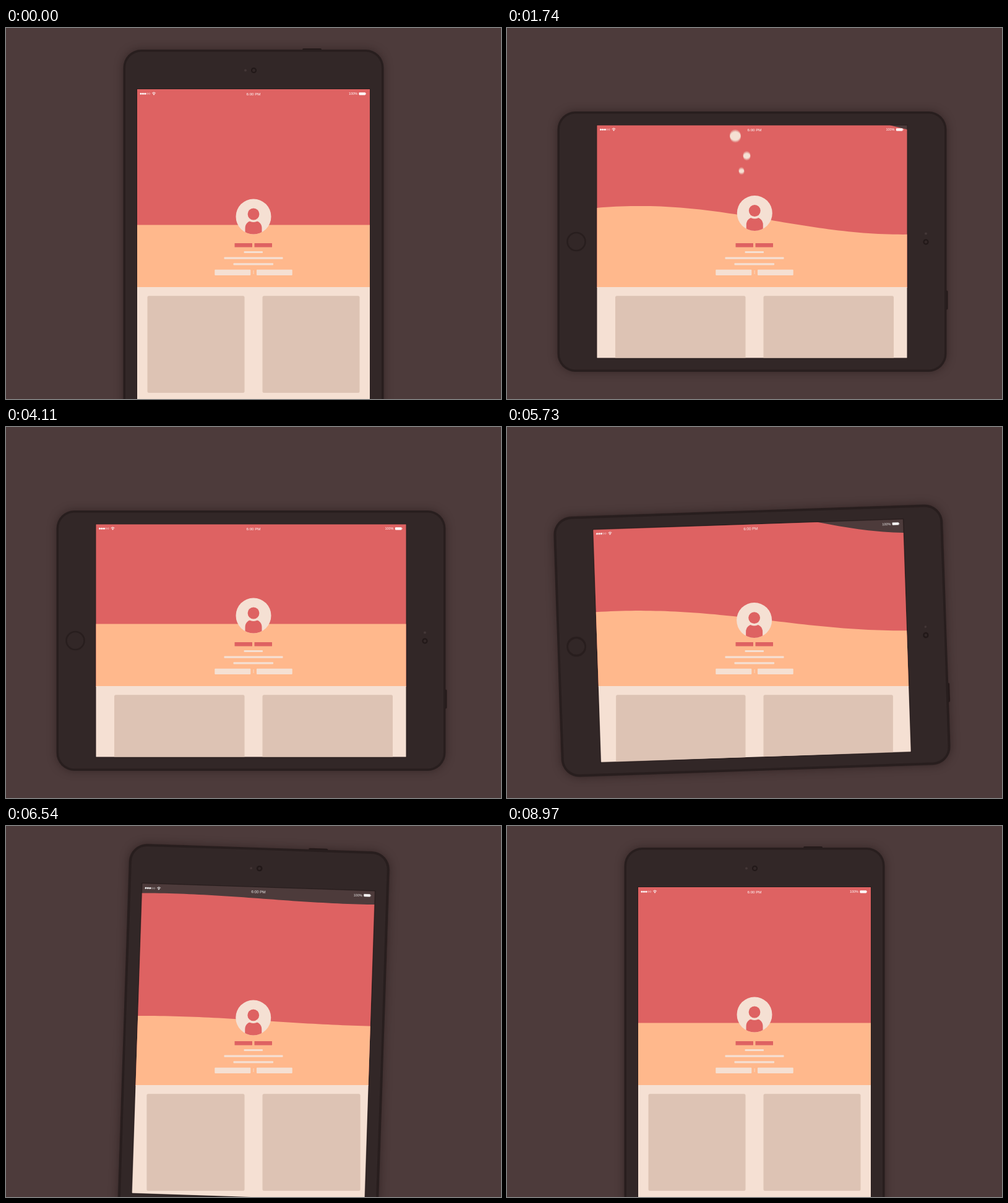
These frames come from a looping animation (800x600 px, 9000 ms). An HTML page with a canvas:

```html
<!DOCTYPE html>
<html lang="en">
<head>
<meta charset="utf-8">
<title>Tablet rotation</title>
<style>
  html, body { margin: 0; width: 100%; height: 100%; overflow: hidden; background: #4d3b3b; }
  canvas { display: block; }
</style>
</head>
<body>
<canvas id="stage" width="800" height="600"></canvas>
<script>
const W = 800, H = 600, LOOP = 9000;
const view = document.getElementById('stage').getContext('2d');
const buffer = document.createElement('canvas');
buffer.width = W;
buffer.height = H;
const g = buffer.getContext('2d');

const C = {
  bg: '#4d3b3b', body: '#322727', edge: '#281e1e', red: '#de6262',
  orange: '#ffb88c', cream: '#f5e0d3', card: '#ddc3b4'
};

// Rotation timing; the return trip replays the same slosh, mirrored.
const START = 366, TURN = 1260, BACK = 5139, SHUTTER = 16;
const PIVOT = [400, 345.5];

// [time, value] keys of the liquid after a turn
const slosh = {
  low: [[366, 0], [591, 16], [1080, 62.5], [1401, 8.8], [1740, -23], [2350, 11], [2900, -5], [3400, 2], [3860, 0]],
  top: [[366, 0], [591, 27.8], [1080, 61], [1401, 9.6], [1740, -46], [2350, 12], [2900, -5], [3400, 2], [3860, 0]],
  lift: [[366, 0], [591, 11.8], [1080, 25], [1401, -18.5], [1740, -28], [2350, 5], [2900, -2], [3860, 0]],
  shift: [[366, 250], [591, 250], [1080, 185], [1401, 215], [1740, 330], [2350, 215], [3860, 215]],
  bob: [[366, 0], [591, 7.5], [1080, 18.5], [1401, 5], [1740, -5.5], [2220, 5.5], [2700, -3], [3150, 1.5], [3550, -0.6], [3860, 0]]
};

// start time, start point, point at 1740 ms, radius
const bubbles = [
  [1000, 388, 307, 369, 175, 9],
  [1150, 396, 310, 387.5, 207, 6],
  [1300, 392, 305, 379, 231.5, 4.5]
];

// Smooth curve through the keys, flat at both ends
function curve(keys, t) {
  const last = keys.length - 1;
  if (t <= keys[0][0]) return keys[0][1];
  if (t >= keys[last][0]) return keys[last][1];
  let i = 0;
  while (t > keys[i + 1][0]) i++;
  const slope = k => k < 1 || k >= last ? 0
    : (keys[k + 1][1] - keys[k - 1][1]) / (keys[k + 1][0] - keys[k - 1][0]);
  const [a, va] = keys[i], [b, vb] = keys[i + 1];
  const d = b - a, u = (t - a) / d, v = 1 - u;
  return va * v * v * (1 + 2 * u) + vb * u * u * (3 - 2 * u)
    + d * u * v * (slope(i) * v - slope(i + 1) * u);
}

// cubic-bezier(.8, 0, .2, 1)
function ease(x) {
  if (x <= 0) return 0;
  if (x >= 1) return 1;
  let lo = 0, hi = 1, u = 0.5;
  for (let i = 0; i < 24; i++) {
    u = (lo + hi) / 2;
    const bx = 2.4 * u * (1 - u) ** 2 + 0.6 * u * u * (1 - u) + u ** 3;
    if (bx < x) lo = u; else hi = u;
  }
  return u * u * (3 - 2 * u);
}

const turned = t => ease((t - START) / TURN) - ease((t - BACK - START) / TURN);

function rect(x, y, w, h, color, r = 0) {
  g.fillStyle = color;
  g.beginPath();
  g.roundRect(x, y, w, h, r);
  g.fill();
}

function disc(x, y, r, color) {
  g.fillStyle = color;
  g.beginPath();
  g.arc(x, y, r, 0, 7);
  g.fill();
}

function ring(x, y, r, width, color) {
  g.strokeStyle = color;
  g.lineWidth = width;
  g.beginPath();
  g.arc(x, y, r, 0, 7);
  g.stroke();
}

function enterDevice(p) {
  g.translate(...PIVOT);
  g.rotate(p * Math.PI / 2);
  g.translate(0, 4);
}

function drawBody() {
  rect(79, -316.5, 31, 6, C.edge, 2);
  g.save();
  g.shadowColor = 'rgba(30,18,18,.5)';
  g.shadowBlur = 14;
  rect(-210.5, -314.5, 421, 629, C.edge, 29);
  g.restore();
  rect(-207, -311, 414, 622, C.body, 25.5);
  ring(0.5, -281, 3.5, 2, '#211818');
  disc(-13, -281, 2, '#443737');
  ring(0, 284, 14.5, 2.6, C.edge);
  rect(-189, -251.5, 378, 503, C.edge);
}

// Fills from the wave y = mid + amp * cos down to a flat bottom.
function wave(mid, amp, x0, half, bottom, color) {
  g.fillStyle = color;
  g.beginPath();
  g.moveTo(0, bottom);
  for (let x = 0; x <= W; x += 8) g.lineTo(x, mid + amp * Math.cos(Math.PI * (x - x0) / half));
  g.lineTo(W, bottom);
  g.fill();
}

function drawAvatar(bob) {
  g.save();
  g.translate(400 - bob * 0.05, 305 + bob);
  disc(0, 0, 28.5, C.cream);
  g.beginPath();
  g.arc(0, 0, 28.5, 0, 7);
  g.clip();
  rect(-13.5, 6.5, 27, 32, C.red, 12);
  disc(0, -4, 13, C.cream);
  disc(0, -4, 9.4, C.red);
  g.restore();
}

function drawBubbles(t) {
  for (const [t0, x0, y0, x1, y1, r] of bubbles) {
    const u = (t - t0) / (1740 - t0);
    if (u < 0) continue;
    const y = y0 + (y1 - y0) * u ** 1.6;
    if (y > 140) disc(x0 + (x1 - x0) * u, y, r, C.cream);
  }
}

function drawPage(t, now, p) {
  const back = t > 5200, s = back ? t - BACK : t, dir = back ? -1 : 1;
  const low = dir * curve(slosh.low, s);
  const top = 98 + 58.5 * p + dir * curve(slosh.lift, s);
  wave(top, dir * curve(slosh.top, s), curve(slosh.shift, s), 405, 420, C.red);
  wave(318.5 + 0.33 * low, low, 215, 425, 420, C.orange);
  rect(0, 419, W, 181, C.cream);

  const wide = 157 + 53.5 * p;
  rect(385.5 - wide, 433.3, wide, 156.7, C.card, 2.5);
  rect(414.5, 433.3, wide, 156.7, C.card, 2.5);

  drawBubbles(now);
  drawAvatar(curve(slosh.bob, s));

  rect(369.5, 348, 28.5, 6.5, C.red, 0.5);
  rect(401.5, 348, 28.5, 6.5, C.red, 0.5);
  rect(384.5, 361, 30.5, 3, C.cream, 1);
  rect(352.5, 370.5, 95, 3.2, C.cream, 1);
  rect(367.5, 380.2, 64.5, 3.3, C.cream, 1);
  rect(337.3, 390.8, 58, 9.2, C.cream, 1);
  rect(405, 390.8, 57.7, 9.2, C.cream, 1);
  rect(399.6, 392, 0.8, 6, C.cream);
}

// x runs from the left to the right edge of the screen, y is the bar's middle.
function drawStatus(left, right, mid, y) {
  for (let i = 0; i < 5; i++) {
    const x = left + 6 + i * 3.4;
    if (i < 3) disc(x, y, 1.5, '#fff');
    else ring(x, y, 1.2, 0.4, '#fff');
  }
  const wx = left + 27;
  g.strokeStyle = '#fff';
  g.lineWidth = 0.9;
  for (const r of [2.3, 4]) {
    g.beginPath();
    g.arc(wx, y + 2, r, -Math.PI * 0.76, -Math.PI * 0.24);
    g.stroke();
  }
  disc(wx, y + 1.4, 0.9, '#fff');

  g.fillStyle = '#fff';
  g.textBaseline = 'alphabetic';
  g.textAlign = 'center';
  g.font = '6.2px "Liberation Sans", Arial, sans-serif';
  g.fillText('6:00 PM', mid, y + 2.3);
  g.textAlign = 'right';
  g.font = '5.5px "Liberation Sans", Arial, sans-serif';
  g.fillText('100%', right - 20, y + 2.2);
  rect(right - 17.6, y - 2, 10.6, 4.2, '#fff', 0.8);
  rect(right - 6.7, y - 0.8, 0.8, 1.8, '#fff', 0.4);
}

// t drives the page, now is the moment within the open shutter.
function drawScene(t, now) {
  const p = turned(now);
  g.fillStyle = C.bg;
  g.fillRect(0, 0, W, H);

  g.save();
  enterDevice(p);
  drawBody();
  g.restore();

  g.save();
  g.save();
  enterDevice(p);
  g.beginPath();
  g.rect(-188, -250.5, 376, 501);
  g.restore();
  g.clip();
  g.fillStyle = C.bg;
  g.fillRect(0, 0, W, H);
  drawPage(t, now, turned(t));
  g.restore();

  g.save();
  enterDevice(p);
  if (p < 0.5) {
    drawStatus(-188, 188, 0, -243.3);
  } else {
    g.rotate(-Math.PI / 2);
    drawStatus(-250.5, 250.5, 4, -181.3);
  }
  g.restore();
}

function render(t) {
  const rising = t > 1000 && t < 2300;
  const turning = Math.abs(turned(t + 8) - turned(t - 8)) > 0.002;
  const n = rising || turning ? 10 : 1;
  for (let i = 0; i < n; i++) {
    drawScene(t, t + ((i + 0.5) / n - 0.5) * SHUTTER);
    view.globalAlpha = 1 / (i + 1);
    view.drawImage(buffer, 0, 0);
  }
}

const begin = performance.now();
function tick() {
  render((performance.now() - begin) % LOOP);
  requestAnimationFrame(tick);
}
tick();
</script>
</body>
</html>
```
